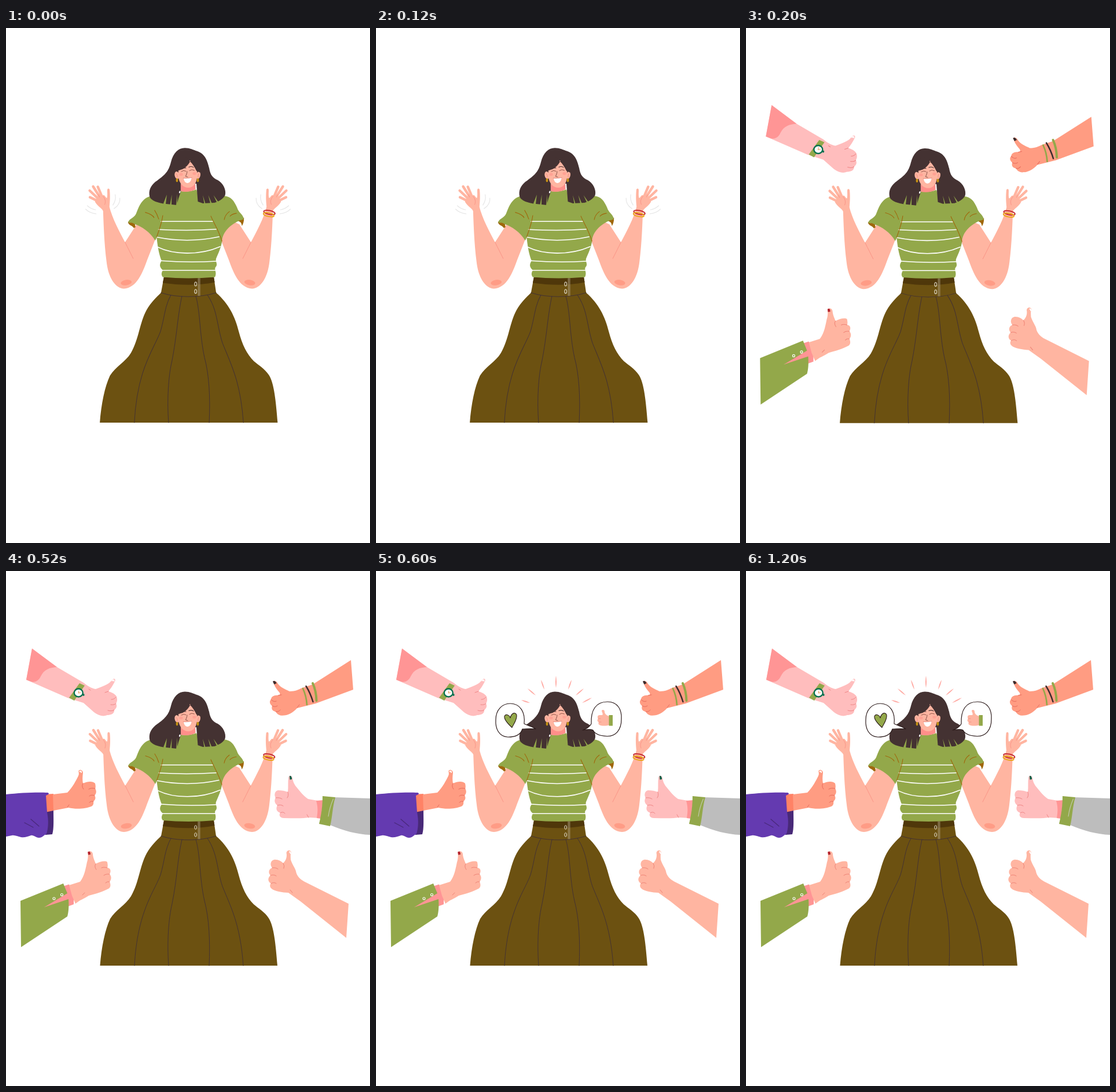
An HTML page with a canvas that plays this animation: 629x890 px, repeating every 1.6 s.

```html
<!DOCTYPE html>
<html lang="en">
<head>
<meta charset="utf-8">
<title>Thumbs up</title>
<style>
html, body { margin: 0; width: 100%; height: 100%; overflow: hidden; background: #fff; }
canvas { display: block; width: 629px; height: 890px; }
</style>
</head>
<body>
<canvas id="stage"></canvas>
<script>
const W = 629, H = 890, LOOP = 1600;
const SKIN = '#ffb5a1', CORAL = '#ff9c82', PINK = '#ffbdbd', ROSE = '#ff9595';
const GREEN = '#93a84a', HAIR = '#443232', BROWN = '#6c5111', INK = '#2b1a1a';

const canvas = document.getElementById('stage');
const ctx = canvas.getContext('2d');
const ratio = window.devicePixelRatio || 1;
canvas.width = W * ratio;
canvas.height = H * ratio;
ctx.lineCap = ctx.lineJoin = 'round';

function fill(color, d) {
  ctx.fillStyle = color;
  ctx.fill(new Path2D(d));
}

function line(color, width, d) {
  ctx.strokeStyle = color;
  ctx.lineWidth = width;
  ctx.stroke(new Path2D(d));
}

function oval(x, y, rx, ry, tilt, color, width) {
  ctx.beginPath();
  ctx.ellipse(x, y, rx, ry, tilt, 0, Math.PI * 2);
  if (width) {
    ctx.strokeStyle = color;
    ctx.lineWidth = width;
    ctx.stroke();
  } else {
    ctx.fillStyle = color;
    ctx.fill();
  }
}

// Scales a drawing about the middle of the figure and lifts it.
function placed(k, lift, draw) {
  ctx.save();
  ctx.translate(315, 400 - lift);
  ctx.scale(k, k);
  ctx.translate(-315, -400);
  draw();
  ctx.restore();
}

function mirrored(draw) {
  ctx.save();
  ctx.translate(W, 0);
  ctx.scale(-1, 1);
  draw();
  ctx.restore();
}

function raisedArm() {
  fill(SKIN, 'M226 340 L206 371 C196 352 184 330 179 310 L168 312 C169 340 170 372 174 404 C177 433 190 451 204 451 C226 450 236 424 244 402 L262 356 L258 325 Z');
  // Open hand
  fill(SKIN, 'M160 290 L170 290 C173 293 174 296 175 294 C176 289 175 283 175.5 280 C176.5 278 179 278 179.5 281 C180.5 292 180 300 179 311 L179 317 L168 317 C167 313 158 309 154 301 Z');
  line(SKIN, 4.4, 'M163 294 L151 275 M167 294 L159 275.5 M161 297 L145 282 M159 300 L145.5 293.5');
  line('#f98d80', .8, 'M206 371 C211 381 216 391 220 399 M168 292 C172 296 173 301 171 306 M160 289 L162 293');
  oval(208, 440.5, 9.5, 4.6, -.15, '#ff9c86');
}

function skirt() {
  fill(BROWN, 'M273 431 L359 431 L363 458 C385 477 396 500 402 525 C408 548 416 564 428 576 C436 583 447 589 454 600 C463 614 466 645 469 682 L162.5 682 C165 650 171 620 180 601 C189 586 207 577 216 562 C230 538 231 510 243 488 C251 474 260 466 268 458 Z');
  fill('#4f370a', 'M273 431 L359 431 L360.5 440 C330 446 300 445 271 441 Z');
  line(HAIR, 1, 'M268 458 C295 467 335 467 363 458');
  line(HAIR, 1, 'M285 462 C274 482 274 502 267 525 C256 555 227 588 222 682 M304 464 C296 500 296 530 287 575 C281 600 278 640 281 682 M328 464 C336 490 334 530 343 570 C351 600 353 640 351 682 M348 462 C366 488 364 515 374 545 C388 580 405 610 410 682');
  line('#b3a587', 1, 'M332.3 433 V463 M334.7 433 V463');
  oval(327.7, 443, 1.9, 3.4, 0, '#e5dfd0', 1);
  oval(327.7, 455.8, 1.9, 3.4, 0, '#e5dfd0', 1);
}

function shirt() {
  fill('#a0670c', 'M211 337 C212 333 216 332 222 333 L224 345 L221 346.5 C219 342 214 343 211 337 Z M403 329 L411 329 C411 335 410 339 407.5 343 C407 338 405 335 400 334 Z');
  fill(GREEN, 'M302 283 C312 284 322 283 329 280 L333 292 L376 291 C389 292 394 300 399 311 C402 321 410 323 410.5 331 C408 333 405 332 402 334 C390 340 374 351 373 370 C371 382 367 389 363 399 C361 404 367 409 362 414 C359 418 365 423 361 431 Q315 435 271 431 C267 426 270 422 271 419 C265 414 265 409 269 403 C264 391 262 376 260.5 363 L258 368 C250 354 234 343 223 340 C218 336 214 338 211.5 337 C213 330 221 330 225 322 C230 310 234 295 252 291 L298 294 Z');
  line('#fff', 1.5, 'M268 335.2 H357 M264 349 Q315 352 363 348.7 M261 362.3 Q315 373 368 361.5 M262 379.3 C290 393 335 394 370 378.5 M268 403 Q315 406.5 364 403.7 M270 419.3 H362');
  line('#a0670c', 1.1, 'M271 325 C269 340 264 351 260.5 362 M257 316 Q261 322 264 331 M241 319.5 Q253 323 256 328.5 M354 326 C360 340 367 350 373 369 M386 318 Q378 324 377 332 M398 321 Q391 322 387 326');
}

function head() {
  fill(HAIR, 'M309 208.5 C318 208.5 324 212 330 214 C345 219 348 232 351 243 C353 255 357 260 366 264 C375 269 381 281 378.5 290 C375 297 366 301 360 303 L340 304 L331.5 301 L329 270 L302 270 L302 284 L298 296 L295 307 L277 305 C263 304 251 299 248.5 293 C246 282 250 274 258 267 C275 255 281 249 285 233 C289 217 298 208.5 309 208.5 Z');
  fill(GREEN, 'M272 304.5 L278 289 L276 306 Z M283.5 306.5 L286.5 289 L286 307 Z M294 307.5 L296 288 L296 308 Z M342.5 304.5 L340 290 L344.5 304.5 Z M353 304 L349.5 290 L355.5 304 Z M364.5 303 L358.5 290 L367 302 Z');
  fill('#ff8f8a', 'M302 262 H327 L327.5 280 C320 284 310 285 302 283 Z');
  oval(300.3, 284.5, 1.2, 2.2, .3, '#fff');
  oval(295.5, 255.5, 4, 6.5, -.2, SKIN);
  oval(332.2, 255.5, 3.6, 6.5, .2, SKIN);
  fill(SKIN, 'M298 242 L318 230 L330 243 L330 259 C329 271 322 277 315 277 C306 277 299 269 298 258 Z');
  fill(HAIR, 'M319 230 C315 240 307 245 299 247 L291 250 L291 236 L306 222 Z M317 231 C322 235 326 241 329 248 L336 251 L343 242 L331 222 L318 226 Z');
  oval(302.5, 254, 3.2, 2.5, 0, '#ffa294');
  oval(325.5, 252.5, 3.2, 2.5, 0, '#ffa294');
  line('#85493f', .9, 'M303 249 Q307 246 311 248.5 M317 247.5 Q321 244.5 325.5 247');
  line(HAIR, 1.1, 'M304 245 Q308 242 311 243 M316 241.5 Q320 239.5 324 242');
  line('#74443d', .9, 'M313 249 C313 253 310.5 256 310.5 257.5 L314 258.5');
  line('#ed8276', .8, 'M294 253 Q297 255 296 259 M333 253 Q331 256 332 259');
  fill('#fff', 'M307 260.5 C312 261 316 260.5 320.5 259.5 C320.5 265 317 269 313.5 269 C310 269 307.5 265 307 260.5 Z');
  line('#c34b43', .5, 'M306.5 260.5 C312 261 316 260.5 321 259.5');
  oval(295.5, 264, 1.8, 3.2, 0, '#c79312');
  oval(331.5, 264, 1.8, 3.2, 0, '#c79312');
}

function woman() {
  raisedArm();
  mirrored(raisedArm);
  oval(454.8, 319.7, 9.8, 3.3, .2, '#c62f35', 2);
  oval(453.6, 323.5, 9.3, 3.1, .2, '#eba51d', 1.9);
  skirt();
  shirt();
  head();
}

function waveMarks() {
  line('#e8e8e8', 1.3, 'M185 307 Q191 298 189 289 M187 313 Q198 306 197 295 M141 308 Q147 314 155 315 M138 314 Q145 321 156 322');
}

function topLeftArm() {
  fill(PINK, 'M45 134 L88 166 L134 193 C140 198 148 203 155 204 C166 200 176 196 180 192 L184 187.5 C188 184.5 190 188 188 191 C184 199 181 203 177 208 C184 210 189 213 191 217 C193 222 192 226 190 229 C193 234 190 238 187 240 C188 247 180 249 175 249 C168 252 160 250 152 244 L134 228 L106 219 L35 188 Z');
  fill(ROSE, 'M45 134 L88 166 C75 167 66 170 60 182 C56 191 48 193 43 191 L35 188 Z');
  line('#fff', 2, 'M183.5 189.5 Q186.5 187 186.5 190');
  line('#ef8585', 1, 'M177 208 L171 210 M182 222 Q187 222 190 218 M181 231 Q187 232 190 229 M176 241 Q183 243 187 240 M143 204 L146 206');
  fill(GREEN, 'M127 194 L136 198 L118 224 L109 219 Z');
  oval(125.3, 210.5, 7.5, 7, 0, '#fff');
  oval(125.3, 210.5, 7.5, 7, 0, '#08704f', 2.4);
  oval(134, 214, 1.6, 2, 0, '#08704f');
  line('#e08c42', .9, 'M126 207 L125 211 L129 210');
}

function topRightArm() {
  fill(CORAL, 'M596 154 L600 205 L535 229 L503 237 C495 246 485 250 480 249.5 C473 251 468 247 466 243 C460 242 458 238 460 233 C455 230 455 224 458 222 C458 217 464 214 470 215 C475 214 474 211 470 207 C466 202 463 197 461.5 191 C464 188 468 191 470 195 C474 201 482 204 490 208 C500 208 505 205 512 202 L530 196 Z');
  fill('#392b2d', 'M461 191 C463 188.5 466.5 191 467.5 194 L463.5 196 Z');
  line('#e86b5c', 1, 'M470 215 L476 214 M458 222 Q462 227 467 225 M460 233 Q465 236 469 233 M466 243 Q471 244 474 240 M503 236 L507 231');
  line(GREEN, 2.7, 'M513 203 Q519 216 520 231');
  line('#3d2d2f', 2.5, 'M518.5 199 Q526 211 530.5 226');
  line(GREEN, 4, 'M530 194 Q536 207 536.5 224');
}

function bottomLeftArm() {
  fill(ROSE, 'M98 545 L109 541.5 L117 560 L117 576 L106 580 L66 581 L98 552 Z');
  fill(SKIN, 'M109 543 L128 537 C136 527 138 512 140 503 C142 498 142 490 141.5 486 C146 482 150 486 150 490 C151 498 154 502 155 506 C162 502 172 500 175 503 C176 508 176 511 175 513 C181 513 182 519 179 524 C183 528 182 534 179 537 C182 543 180 548 177 549 C168 554 155 558 143 561 C134 567 128 568 120 575 L114 561 Z');
  fill(GREEN, 'M25 570 L99 540 L106 557 L66 581 L108 567 C109 580 108 590 106 597 L26 650 Z');
  fill('#b3232d', 'M141.3 485.5 C144 484 146 484.5 146 490 L142 490.5 Z');
  line('#ef8476', 1, 'M155 506 Q152 511 156 516 M175 513 Q169 511 165 513 M179 524 Q173 523 169 526 M179 537 Q175 536 172 539 M132 560 L136 556');
  oval(83, 566, 2, 2, 0, '#fff', 1.1);
  oval(96.5, 559.5, 2, 2, 0, '#fff', 1.1);
}

function bottomRightArm() {
  fill(SKIN, 'M592 575 L588 634 L509 571 L488 556 C478 556 463 553 459 549 C455 546 456 541 458 540 C452 537 452 530 457 526 C452 521 455 514 460 513 C455 507 458 500 463 499 C470 498 476 502 479 505 C484 500 486 494 484.5 487 C486 481 492 482 493 486 C491 490 492 495 492 499 C495 508 500 514 501 519 C502 526 508 533 516 537 Z');
  line('#fff', 2, 'M490 485.5 Q492 485 491.5 488');
  line('#ef8476', 1, 'M479 505 Q482 510 480 514 M460 513 Q466 512 470 515 M457 526 Q463 524 467 527 M458 540 Q463 537 467 540 M491 551 L495 556');
}

function midLeftArm() {
  fill('#ff8266', 'M66 386 L82 385 L83 414 L68 418 Z');
  fill(CORAL, 'M81 386 L106 383 C115 374 121 362 125 354 C127 350 125 348 125.5 345 C129 342 133 345 133 349 C132 356 132 362 133 367 C142 363 150 363 154 367 C155 372 155 374 154 376 C157 380 156 385 153 388 C156 392 154 396 151 398 C152 403 150 406 147 407 C138 411 120 412 108 409 L82 414 Z');
  fill('#482978', 'M68 417 L82 414 C82 430 83 445 80 455 L68 456 Z');
  fill('#643ab0', 'M0 386 C25 383 55 382 72 383 C75 384 75 386 69 388 L71 417 C74 432 73 445 70 454 C66 456 63 461 57 461 C51 461 48 456 43 457 C37 459 32 461 26 460 C20 459 16 456 10 457 L0 459 Z');
  line('#482978', 1.2, 'M32 435 L47 443 M43 429 L57 441');
  line('#fff', 2, 'M127.5 346.5 Q130 345 130 348');
  line('#e86b5c', 1, 'M133 367 Q130 372 134 377 M154 376 Q147 374 143 377 M153 388 Q147 386 144 389 M151 398 Q147 397 144 400 M106 408 L109 404');
}

function midRightArm() {
  fill(PINK, 'M488 357 C489 352 494 353 495 358 C496 364 498 368 500 371 C505 377 513 388 522 394 L539 397 L541 427 L524 426 C512 428 495 427 480 427 C473 427 471 421 474 418 C467 416 466 410 469 405 C464 402 463 396 466 392 C463 388 464 380 470 379 C477 379 482 380 487 382 C488 373 487 365 488 357 Z');
  fill(ROSE, 'M536 397 L548 396 L544 428 L537 427 C539 415 539 407 536 397 Z');
  fill('#bdbdbd', 'M566 391 L629 393 L629 456 C606 455 584 449 560 439 Z');
  fill(GREEN, 'M547 389 L569 391 C564 408 564 426 560 441 L541 437 C545 420 547 405 547 389 Z');
  line('#c5c9b5', 1.1, 'M565.5 394 Q559 409 557 424');
  fill('#0c6047', 'M490 354.5 C492 353 494 355 494 360 L490.5 360.5 Z');
  line('#ef8585', 1, 'M487 382 Q489 388 486 392 M466 392 Q473 391 477 394 M469 405 Q475 403 479 406 M474 418 Q479 415 482 419 M520 421 L523 426');
}

function rays() {
  const marks = [[262, 203, 276, 215], [251, 223, 266, 228], [285, 188, 291, 205],
    [311, 181, 311, 202], [338, 188, 332, 205], [359, 203, 345, 215], [373, 219, 356, 228]];
  for (const [x1, y1, x2, y2] of marks) {
    const mx = (x1 + x2) / 2, my = (y1 + y2) / 2;
    const len = Math.hypot(x2 - x1, y2 - y1);
    const nx = 2 * (y1 - y2) / len, ny = 2 * (x2 - x1) / len;
    fill('#ffaaa3', `M${x1} ${y1} Q${mx + nx} ${my + ny} ${x2} ${y2} Q${mx - nx} ${my - ny} ${x1} ${y1} Z`);
  }
}

function bubble(d) {
  fill('#fff', d);
  line(INK, 1.2, d);
}

function bubbles() {
  bubble('M256 264 C264 268 271 269 276 273 C268 272 260 273 253 273 C250 283 240 287 228 287 C212 286 206 272 207 257 C207 240 218 229 232 229 C250 229 258 245 256 264 Z');
  bubble('M372 264 C371 240 380 226 400 226 C418 226 425 240 424 256 C424 275 414 286 399 285.5 C386 285 378 281 375 275 C371 273 363 274 357 275 C364 272 369 270 372 264 Z');
  const heart = 'M235 270.5 C229 265 221 257 222 251 C224 246 231 249 232 254 C234 245 241 243 243 249 C244 257 238 264 235 270.5 Z';
  fill(GREEN, heart);
  line(INK, 1.1, heart);
  fill(SKIN, 'M390 241 C392 239 395 240 395 243 C395 247 399 250 403 251 L403 266 C398 268 390 268 386 266 C384 265 384 263 385 261 C382 260 382 257 384 255 C382 253 383 249 386 249 L391 249 C393 247 390 244 390 241 Z');
  line('#ef8476', .7, 'M384 255 H388 M385 261 H389');
  fill(GREEN, 'M402.5 249 L409 249 L409 267.5 L402.5 267.5 Z');
}

function render(t) {
  const grow = t < 400 ? 1.0025 : 1;
  const lift = t < 200 ? .7 : 0;
  ctx.setTransform(ratio, 0, 0, ratio, 0, 0);
  ctx.fillStyle = '#fff';
  ctx.fillRect(0, 0, W, H);
  placed(grow, lift, () => {
    if (t < 200) {
      waveMarks();
      mirrored(waveMarks);
    }
    if (t >= 600) rays();
    woman();
    if (t >= 200) {
      topLeftArm();
      topRightArm();
      bottomLeftArm();
      bottomRightArm();
    }
    if (t >= 400) {
      midLeftArm();
      midRightArm();
    }
    if (t >= 600) bubbles();
  });
}

const start = performance.now();
function tick() {
  render((performance.now() - start) % LOOP);
  requestAnimationFrame(tick);
}
tick();
</script>
</body>
</html>
```
